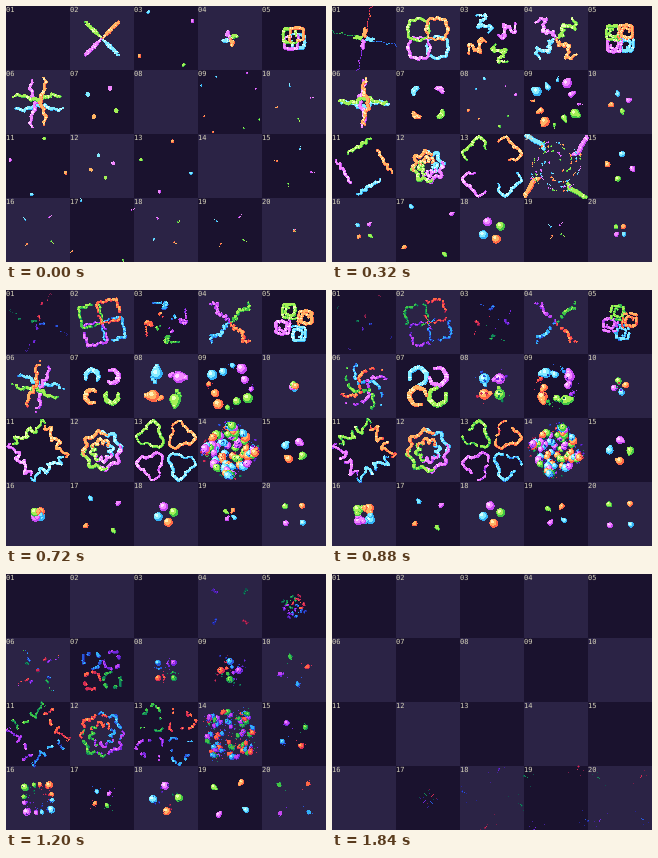
An HTML page with a canvas that plays this animation: 320 px wide and 256 px high, repeating every 1920 ms.

```html
<!DOCTYPE html>
<html>
<head>
<meta charset="utf-8">
<style>
html, body { margin: 0; width: 320px; height: 256px; overflow: hidden; background: #1a122e; }
canvas { display: block; width: 320px; height: 256px; image-rendering: pixelated; }
</style>
</head>
<body>
<canvas id="stage" width="320" height="256"></canvas>
<script>
const g = document.getElementById('stage').getContext('2d');
const STEP = 80, COUNT = 24;
// four arms, clockwise; each ramp runs from hot to cold
const ramps = [
  ['#d8ffff', '#84ecff', '#34b0f4', '#2858dc', '#242494'],
  ['#ffd8ff', '#f288ff', '#c446f0', '#7426dc', '#42209c'],
  ['#ecffb4', '#a4f056', '#42c446', '#128a58', '#0e4e4a'],
  ['#fff2b4', '#ffb464', '#ff6646', '#d42c54', '#7a1c48']
];

const { sin, cos, PI, abs, max, min, floor, round } = Math;
const mix = (a, b, u) => a + (b - a) * u;
const ramp = (f, a, b) => max(0, min(1, (f - a) / (b - a)));
const ease = (f, a, b) => { const u = ramp(f, a, b); return u * u * (3 - 2 * u); };
const hash = n => { const v = sin(n * 127.1 + 11.7) * 43758.5453; return v - floor(v); };
const polar = (r, deg) => [r * cos(deg * PI / 180), r * sin(deg * PI / 180)];
const add = (a, b) => [a[0] + b[0], a[1] + b[1]];
const blend = (a, b, u) => [mix(a[0], b[0], u), mix(a[1], b[1], u)];
// outline between a circle (p = 2) and a square (large p)
const boxy = (r, deg, p) => {
  const [x, y] = polar(1, deg);
  return polar(r / (abs(x) ** p + abs(y) ** p) ** (1 / p), deg);
};

const layers = [];

// A line along path(s, f): grows from t0 to t1, crumbles from t2 to t3.
function stroke(id, [t0, t1, t2, t3], width, path, { jag = 1, hot = .27, n = 64 } = {}) {
  const seed = layers.length * 5.3;
  layers.push({ id, beads(f) {
    const fade = ramp(f, t2, t3), out = [];
    if (f < t0 || fade >= 1) return out;
    const count = max(2, round(n * ramp(f, t0, t1)));
    for (let i = 0; i < count; i++) {
      const chip = hash(seed + floor(i / 3) * 3.7);
      if (chip < fade * 1.05) continue;
      const [x, y] = path(i / n, f), push = 1 + fade * .2 * (hash(seed + i) - .4);
      const taper = .65 + .35 * sin(PI * (i + .5) / count);
      out.push({
        x: x * push + jag * sin(i * .7 + seed), y: y * push + jag * cos(i * .53 + seed),
        r: width * taper * (1 - .45 * fade), age: hot + .6 * fade + (hash(seed + i * 1.9) - .5) * .26
      });
    }
    return out;
  } });
}

// A moving drop with a short tail; it sheds specks as it cools.
function drop(id, [t0, t1, t2, t3], size, path) {
  const seed = layers.length * 5.3;
  layers.push({ id, beads(f) {
    const fade = ramp(f, t2, t3), out = [];
    if (f < t0 || fade >= 1) return out;
    const r = max(1, size * ease(f, t0, t1)) * (1 - .85 * fade);
    for (let j = 2; j >= 0; j--) {
      const [x, y] = path(f - j * .7);
      out.push({ x, y, r: r * (1 - .27 * j), age: .27 + .5 * fade + j * .05 });
    }
    for (let j = 0; j < 3 && fade > 0; j++) {
      const [x, y] = add(path(f - 1 - j), polar(3 + 5 * fade, 360 * hash(seed + j)));
      out.push({ x, y, r: r * .3, age: .6 + .35 * fade });
    }
    return out;
  } });
}

// A drop on a straight line through the middle of the cell.
const cross = (id, times, size, from, speed, deg) =>
  drop(id, times, size, f => polar(from + speed * f, deg));

stroke(1, [1, 4, 5, 12], 1.9, (s, f) => polar(2 + 2 * f * s, 5 + f), { n: 20 });
stroke(1, [1, 4, 5, 14], .8, (s, f) => polar(10 + 24 * s, 12 + 3 * s * (f - 4)), { n: 26, hot: .65 });

stroke(2, [-4, 0, 7, 15], 1.7, (s, f) => {
  const ring = add(polar(13, 45), boxy(10.5, 225 + 360 * s, 2 + 5 * ease(f, 3, 7)));
  const [x, y] = blend(polar(2 + 22 * s, 45), ring, ease(f, 0, 3));
  const tilt = -.25 * ease(f, 3, 7);
  return [x * cos(tilt) - y * sin(tilt), x * sin(tilt) + y * cos(tilt)];
}, { jag: .7, n: 80 });

stroke(3, [0, 4, 7, 14], 1.8, (s, f) =>
  polar(mix(31 - f, 7, s), 235 + 100 * s * ease(f, 3, 7) + 18 * sin(10 * s)));

stroke(4, [-1, 3, 7, 17], 1.9, (s, f) =>
  polar(2 + (24 + .3 * f) * s, 135 + (22 - 1.5 * f) * sin(10 * s)));

stroke(5, [-4, 3, 10, 18], 1.8, (s, f) => {
  const turn = 35 * sin(PI * ramp(f, 7, 15));
  return add(polar(9 - 4 * cos(PI * f / 8), 45 + turn), boxy(8 - 5 * s, 225 + 580 * s, 7));
}, { jag: .4, n: 76 });

stroke(6, [-2, 0, 8, 19], 1.9, (s, f) => {
  const x = -23 + 48 * s, y = 5 * cos(f * .3) + 2.5 * sin(9 * s + f);
  const a = abs(x) * .045 * ease(f, 7, 12);
  return [x * cos(a) - y * sin(a), x * sin(a) + y * cos(a)];
});

stroke(7, [0, 4, 11, 18], 2.6, (s, f) =>
  add(polar(14, 225), polar(4.5 + 4 * ease(f, 7, 11), 160 + s * mix(60, 290, ramp(f, 2, 11)))), { jag: .3, n: 46 });

for (const k of [0, 1]) {
  drop(8, [2, 8, 10, 19], 6 - 3.6 * k, f => {
    const u = ease(f, 6, 11);
    return polar(mix(25, 11, u) - 4 * k, 252 - 27 * u - 32 * k);
  });
}

for (const k of [0, 1, 2]) {
  drop(9, [k - 1, 5 + k, 13 - 3 * k, 19 - k], 5.2 - 1.1 * k, f => {
    const u = ease(f, 8, 15);
    return polar(34 - 12 * ramp(f, 0, 4) - 13 * u - 5 * (k % 2), 210 + 60 * u + 32 * k);
  });
}

cross(10, [-2, 7, 10, 22], 3.5, -17, 2.1, 75);

stroke(11, [0, 6, 10, 22], 1.7, (s, f) => {
  const [x, y] = blend(polar(28, 102), polar(28, 12), s);
  const wave = 1 + .2 * sin(6 * PI * s) * ease(f, 5, 11);
  return [x * wave, y * wave];
});

for (const k of [0, 1]) {
  stroke(12, [k * 2, 4, 10, 23], 1.9 - .2 * k, (s, f) =>
    polar((11 + min(9, .75 * f)) * (1 - .48 * k) + 2 * sin(6 * PI * s), 255 + 40 * k + 125 * s), { jag: .6, n: 56 - 20 * k });
}

stroke(13, [0, 7, 10, 23], 1.7, (s, f) => {
  const a = -40 + 360 * s;
  return add(polar(21, 45), polar(11.5 - 3 * cos(3 * (a - 45) * PI / 180), a));
}, { jag: .7, n: 84 });

stroke(14, [2, 4, 5, 7], 2.6, s => polar(44 - 24 * s, 225 + 14 * s), { n: 24 });
for (let k = 0; k < 15; k++) {
  const r = 8 + 20 * (k / 15) ** .6, a = 360 * hash(k + 40);
  drop(14, [4, 7, 8, 22], 3 + 2.4 * hash(k + 70), f => polar(r - 3 * sin(PI * ramp(f, 7, 15)), a + 6 * f));
}

drop(15, [-2, 7, 11, 23], 4, f => polar(10 + .1 * (f - 9) ** 2, -72 - 140 * ease(f, 2, 15)));

for (const k of [0, 1, -1]) {
  cross(16, [-1 + 6 * abs(k), 10, 13, 23], 4.6 - 1.9 * abs(k), -17 + 3 * abs(k), 2.3 - .4 * abs(k), 40 + 33 * k);
}

cross(17, [-1, 5, 13, 25], 2.5, 36, -1.85, 235);

drop(18, [-1, 4, 14, 24], 4.5, f => polar(8 + .1 * (f - 8) ** 2, 145 + 2.1 * f));

cross(19, [-1, 14, 18, 25], 3, -16, 2.4, 35);
cross(20, [-1, 6, 11, 25], 3, 0, 1.35, 43);

function disc(cx, cy, r) {
  if (r < .95) { g.fillRect(round(cx), round(cy), 1, 1); return; }
  for (let y = Math.ceil(cy - r); y <= cy + r; y++) {
    const h = Math.sqrt(r * r - (y - cy) ** 2), x = round(cx - h);
    g.fillRect(x, y, max(1, round(cx + h) - x), 1);
  }
}

// turn the beads into four arms: a dark rim first, then the lit core
function drawArms(beads, ox, oy) {
  ramps.forEach((tones, arm) => {
    const c = [1, 0, -1, 0][arm], s = [0, 1, 0, -1][arm];
    for (const lit of [0, 1]) {
      for (const b of beads) {
        if (lit && b.r < 1) continue;
        const lift = lit * min(1, b.r * .2);
        const age = b.age + (lit || b.r < 1 ? 0 : .18);
        g.fillStyle = tones[max(0, min(4, floor(age * 5)))];
        disc(ox + b.x * c - b.y * s - lift, oy + b.x * s + b.y * c - lift, b.r * (lit ? .75 : 1));
        if (lit && b.r > 2.5) {
          g.fillStyle = tones[max(0, floor(age * 5) - 1)];
          disc(ox + b.x * c - b.y * s - lift * 1.6, oy + b.x * s + b.y * c - lift * 1.6, b.r * .35);
        }
      }
    }
  });
}

const corner = i => [i % 5 * 64, floor(i / 5) * 64];

function draw(f) {
  for (let i = 0; i < 20; i++) {
    g.fillStyle = (i % 5 + floor(i / 5)) % 2 ? '#2b2345' : '#1a122e';
    g.fillRect(...corner(i), 64, 64);
  }
  for (const l of layers) {
    const [x, y] = corner(l.id - 1);
    drawArms(l.beads(f), x + 32, y + 32);
  }
  g.fillStyle = '#d6d2ba';
  g.font = '7px "DejaVu Sans Mono", monospace';
  for (let i = 0; i < 20; i++) {
    const [x, y] = corner(i);
    g.fillText(String(i + 1).padStart(2, '0'), x, y + 6);
  }
}

let shown = -1;
const start = performance.now();
function tick() {
  const f = floor(max(0, performance.now() - start) / STEP) % COUNT;
  if (f !== shown) draw(shown = f);
  requestAnimationFrame(tick);
}
tick();
</script>
</body>
</html>
```
